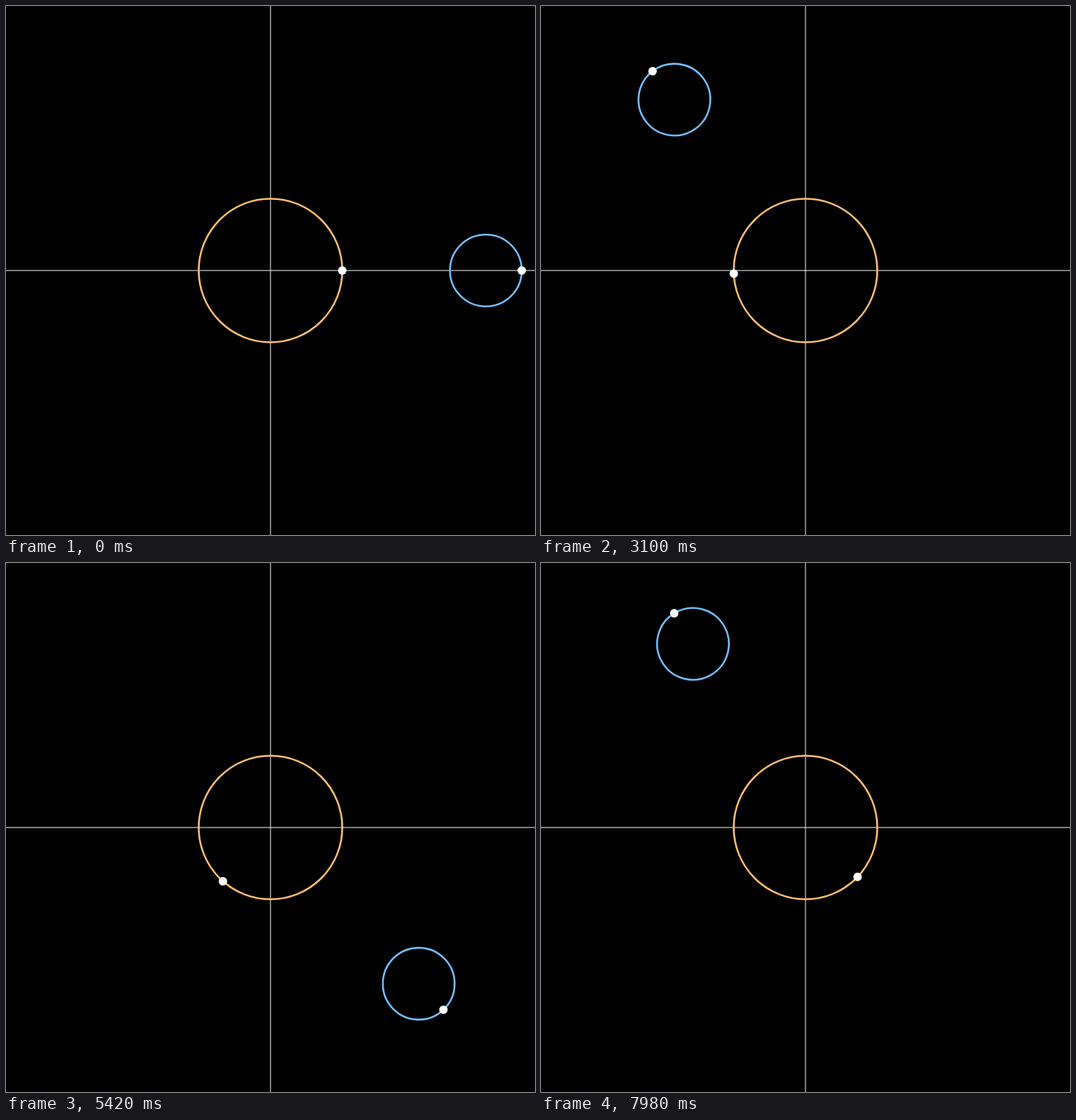
Animation, 748 px wide and 748 px high, one loop 8 s. Source, as an HTML page:

```html
<!DOCTYPE html>
<html lang="en">
<head>
<meta charset="utf-8">
<title>Orbiting circles</title>
<style>
  html, body { margin: 0; width: 100%; height: 100%; overflow: hidden; background: #000; }
  svg { display: block; width: 100vw; height: 100vh; }
  .axis { stroke: #fff; stroke-width: 1; }
  .ring { fill: none; stroke-width: 2.6; }
  .dot { fill: #fff; }
</style>
</head>
<body>
<svg viewBox="-374 -374 748 748">
  <path class="axis" d="M-374 0H374"/>
  <path class="axis" d="M0 -374V374"/>
  <circle class="ring" r="101.5" stroke="#ffbe73"/>
  <g id="inner"><circle class="dot" cx="101.5" r="6"/></g>
  <g id="outer">
    <circle class="ring" cx="304.5" r="50.75" stroke="#73beff"/>
    <circle class="dot" cx="355.25" r="6"/>
  </g>
</svg>
<script>
  const LOOP = 8000, STEP = 20;
  // Degrees per millisecond, positive is clockwise
  const SPEEDS = { inner: -0.175, outer: 0.075 };
  const start = performance.now();

  function draw() {
    const elapsed = (performance.now() - start) % LOOP;
    const time = Math.floor(elapsed / STEP) * STEP;
    for (const [id, speed] of Object.entries(SPEEDS)) {
      document.getElementById(id).setAttribute('transform', `rotate(${time * speed})`);
    }
    requestAnimationFrame(draw);
  }
  draw();
</script>
</body>
</html>
```
